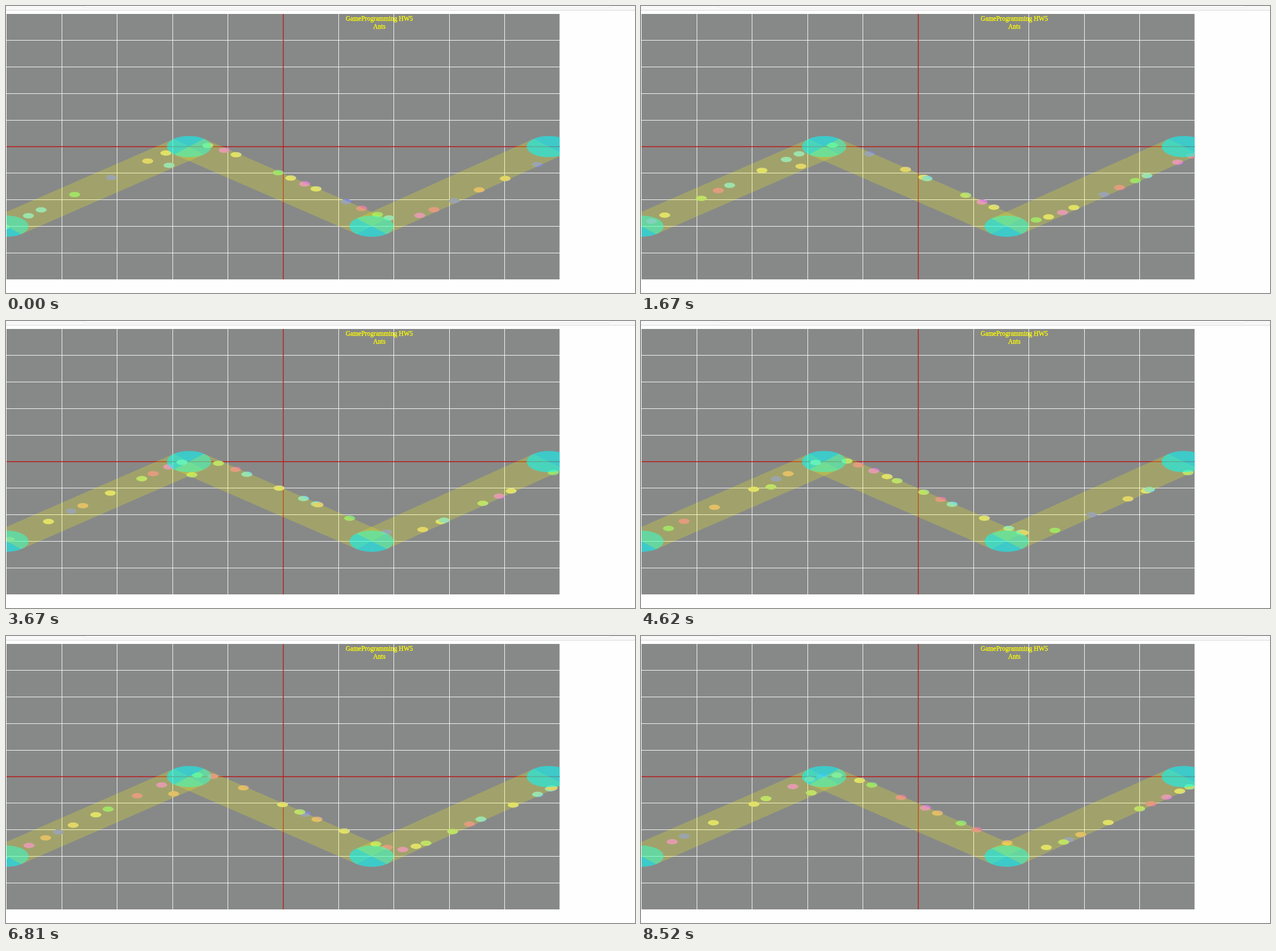
These frames come from a looping animation (1107x506 px, 8600 ms). An HTML page:

```html
<!DOCTYPE html>
<html lang="en">
<head>
<meta charset="utf-8">
<title>Ants</title>
<style>
  html, body { margin: 0; width: 100%; height: 100%; overflow: hidden; background: #fefefe; }
  svg { display: block; }
  text {
    font: 11.5px "Liberation Serif", serif; text-anchor: middle;
    fill: #ff0; stroke: #ff0; stroke-width: 0.3px;
  }
</style>
</head>
<body>
<svg id="stage" width="1107" height="506" viewBox="0 0 1107 506">
  <defs><clipPath id="field"><rect x="1" y="14" width="973.5" height="468"/></clipPath></defs>
  <rect width="1107" height="7" fill="#f8f8f8"/>
  <rect x="133" y="-20" width="935" height="23" rx="8" fill="#fff" stroke="#e6e6e6"/>
  <rect y="7" width="1107" height="1" fill="#d9d9d9"/>
  <g clip-path="url(#field)">
    <rect x="1" y="14" width="973.5" height="468" fill="#878988"/>
    <g id="grid"></g>
    <g id="ants"></g>
    <g id="trail" transform="translate(487.8 247.9) scale(48.7 23.4)"></g>
  </g>
  <text x="657" y="26">GameProgramming HW5</text>
  <text x="657" y="40">Ants</text>
</svg>
<script>
const LOOP = 8600;
const STEP = 78;       // ms between redraws
const STRIDE = 10.3;   // pixels per redraw
const LAST_STEP = 109;

function add(parent, tag, attrs) {
  const node = document.createElementNS('http://www.w3.org/2000/svg', tag);
  for (const name in attrs) node.setAttribute(name, attrs[name]);
  return document.getElementById(parent).appendChild(node);
}

function seededRandom(seed) {
  return () => {
    seed = (seed + 0x6D2B79F5) | 0;
    let t = Math.imul(seed ^ (seed >>> 15), 1 | seed);
    t = (t + Math.imul(t ^ (t >>> 7), 61 | t)) ^ t;
    return ((t ^ (t >>> 14)) >>> 0) / 2 ** 32;
  };
}

// Grid and its red axes
for (let i = 1; i < 10; i++) {
  if (i === 5) continue;
  const x = Math.floor(1 + 97.4 * i) + 0.5;
  const y = Math.floor(13.9 + 46.8 * i) + 0.5;
  add('grid', 'path', { d: `M${x} 14V482M1 ${y}H975`, stroke: '#f4f4f4' });
}
add('grid', 'path', { d: 'M488 14V482M1 248H975', stroke: '#b81a1a', 'stroke-width': 1.4 });

// Waypoints and the bands between them, in grid units
const waypoints = [[-10, 6], [-3.4, 0], [3.2, 6], [9.6, 0]];
waypoints.forEach(([x, y], i) => {
  add('trail', 'circle', { cx: x, cy: y, r: 0.8, fill: 'rgba(0,255,255,.55)' });
  const next = waypoints[i + 1];
  if (next) add('trail', 'path', {
    d: `M${x} ${y}L${next}`, stroke: 'rgba(255,255,0,.21)', 'stroke-width': 1.6
  });
});

// Ants keep to the middle at first, then hug the edge of each band
const route = [
  [0, 388], [230, 282], [300, 251], [330, 245], [360, 246], [400, 260],
  [645, 365], [690, 378.5], [733, 368], [975, 262]
];

function routeY(x) {
  const i = Math.max(1, route.findIndex(([px]) => px >= x));
  const [x0, y0] = route[i - 1], [x1, y1] = route[i];
  return y0 + (y1 - y0) * (x - x0) / (x1 - x0);
}

// Late joiners cut below the first corner
function detour(x) {
  return x > 200 && x < 430 ? 26 * Math.sin(Math.PI * (x - 200) / 230) : 0;
}

const random = seededRandom(5);
const hues = [30, 50, 62, 90, 115, 180, 233, 300, 340];
const ants = [];

function addAnt(start, late) {
  const hue = hues[Math.floor(random() * hues.length)];
  const node = add('ants', 'ellipse', { rx: 9.7, ry: 4.7, fill: `hsl(${hue} 54% 68%)` });
  ants.push({ start, late, node });
}

const journey = STRIDE * LAST_STEP;
for (let x = 935; x > -journey; x -= 20 + 55 * random() ** 1.6) addAnt(x, false);
for (let x = 287; x > -journey; x -= 222) addAnt(x, true);

function draw(time) {
  const step = Math.min(LAST_STEP, Math.floor(time / STEP + 0.2));
  for (const { start, late, node } of ants) {
    const x = start + step * STRIDE;
    const shown = x > (late ? 180 : -10) && x < 975;
    node.setAttribute('visibility', shown ? 'visible' : 'hidden');
    if (!shown) continue;
    node.setAttribute('cx', x);
    node.setAttribute('cy', routeY(x) + (late ? detour(x) : 0));
  }
}

const begin = performance.now();
function tick() {
  draw((performance.now() - begin) % LOOP);
  requestAnimationFrame(tick);
}
tick();
</script>
</body>
</html>
```
